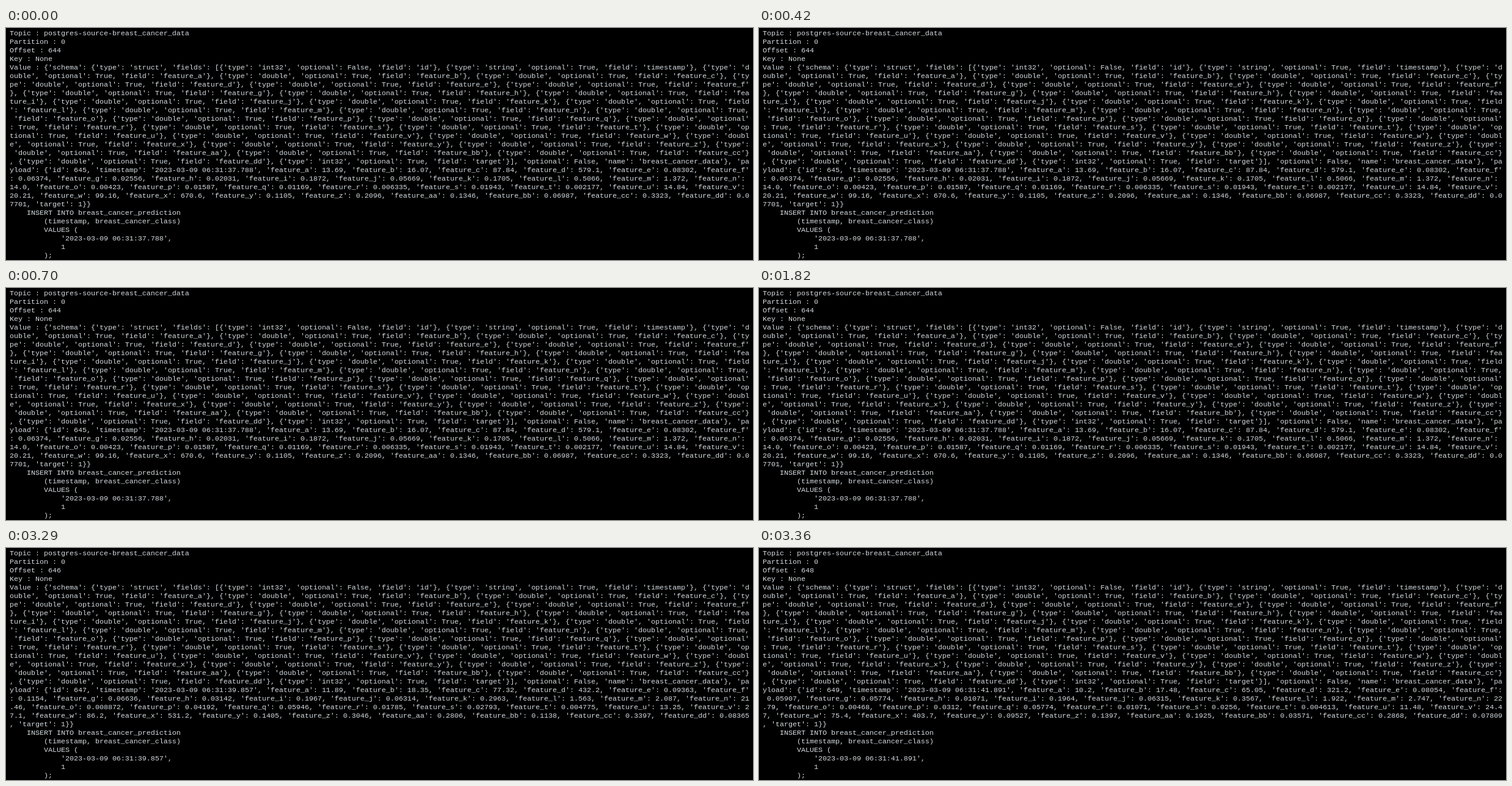
An HTML page for the animation above (8000 ms loop, 1222 by 380 pixels).

```html
<!DOCTYPE html>
<html lang="en">
<head>
<meta charset="utf-8">
<title>Stream consumer log</title>
<style>
  html, body { margin: 0; width: 100%; height: 100%; overflow: hidden; background: #000; }
  #terminal {
    position: absolute; left: 6px; top: 2px; margin: 0;
    color: #d6dce0; white-space: pre;
    font: 11.665px/14px "Liberation Mono", "Courier New", monospace;
    font-variant-ligatures: none;
  }
</style>
</head>
<body>
<pre id="terminal"></pre>
<script>
const LOOP = 8000;
const COLUMNS = 173;
const TABLE = "breast_cancer_data";

const messages = [
  { start: 0, offset: 644, time: "06:31:37.788", values:
    "13.69 16.07 87.84 579.1 0.08302 0.06374 0.02556 0.02031 0.1872 0.05669 " +
    "0.1705 0.5066 1.372 14.0 0.00423 0.01587 0.01169 0.006335 0.01943 0.002177 " +
    "14.84 20.21 99.16 670.6 0.1105 0.2096 0.1346 0.06987 0.3323 0.07701" },
  { start: 3290, offset: 646, time: "06:31:39.857", values:
    "11.89 18.35 77.32 432.2 0.09363 0.1154 0.06636 0.03142 0.1967 0.06314 " +
    "0.2963 1.563 2.087 21.46 0.008872 0.04192 0.05946 0.01785 0.02793 0.004775 " +
    "13.25 27.1 86.2 531.2 0.1405 0.3046 0.2806 0.1138 0.3397 0.08365" },
  { start: 3360, offset: 648, time: "06:31:41.891", values:
    "10.2 17.48 65.05 321.2 0.08054 0.05907 0.05774 0.01071 0.1964 0.06315 " +
    "0.3567 1.922 2.747 22.79 0.00468 0.0312 0.05774 0.01071 0.0256 0.004613 " +
    "11.48 24.47 75.4 403.7 0.09527 0.1397 0.1925 0.03571 0.2868 0.07809" },
];

const features = [..."abcdefghijklmnopqrstuvwxyz", "aa", "bb", "cc", "dd"]
  .map(suffix => "feature_" + suffix);

const field = (type, name, optional = "True") =>
  `{'type': '${type}', 'optional': ${optional}, 'field': '${name}'}`;

const schemaFields = [
  field("int32", "id", "False"),
  field("string", "timestamp"),
  ...features.map(name => field("double", name)),
  field("int32", "target"),
].join(", ");

// Terminal wrapping: break at the last column, even inside a word.
const wrap = text => text.match(new RegExp(`.{1,${COLUMNS}}`, "g")).join("\n");

function render({ offset, time, values }) {
  const timestamp = `'2023-03-09 ${time}'`;
  const numbers = values.split(" ");
  const payload = [
    `'id': ${offset + 1}`,
    `'timestamp': ${timestamp}`,
    ...features.map((name, i) => `'${name}': ${numbers[i]}`),
    "'target': 1",
  ].join(", ");
  const schema = `{'type': 'struct', 'fields': [${schemaFields}], 'optional': False, 'name': '${TABLE}'}`;

  return [
    `Topic : postgres-source-${TABLE}`,
    "Partition : 0",
    `Offset : ${offset}`,
    "Key : None",
    wrap(`Value : {'schema': ${schema}, 'payload': {${payload}}}`),
    "    INSERT INTO breast_cancer_prediction",
    "        (timestamp, breast_cancer_class)",
    "        VALUES (",
    `            ${timestamp},`,
    "            1",
    "        );",
  ].join("\n");
}

const screens = messages.map(render);
const terminal = document.getElementById("terminal");
const origin = performance.now();
let shown = -1;

function draw() {
  const time = (performance.now() - origin) % LOOP;
  const current = messages.findLastIndex(message => message.start <= time);
  if (current !== shown) {
    terminal.textContent = screens[current];
    shown = current;
  }
  requestAnimationFrame(draw);
}
draw();
</script>
</body>
</html>
```
